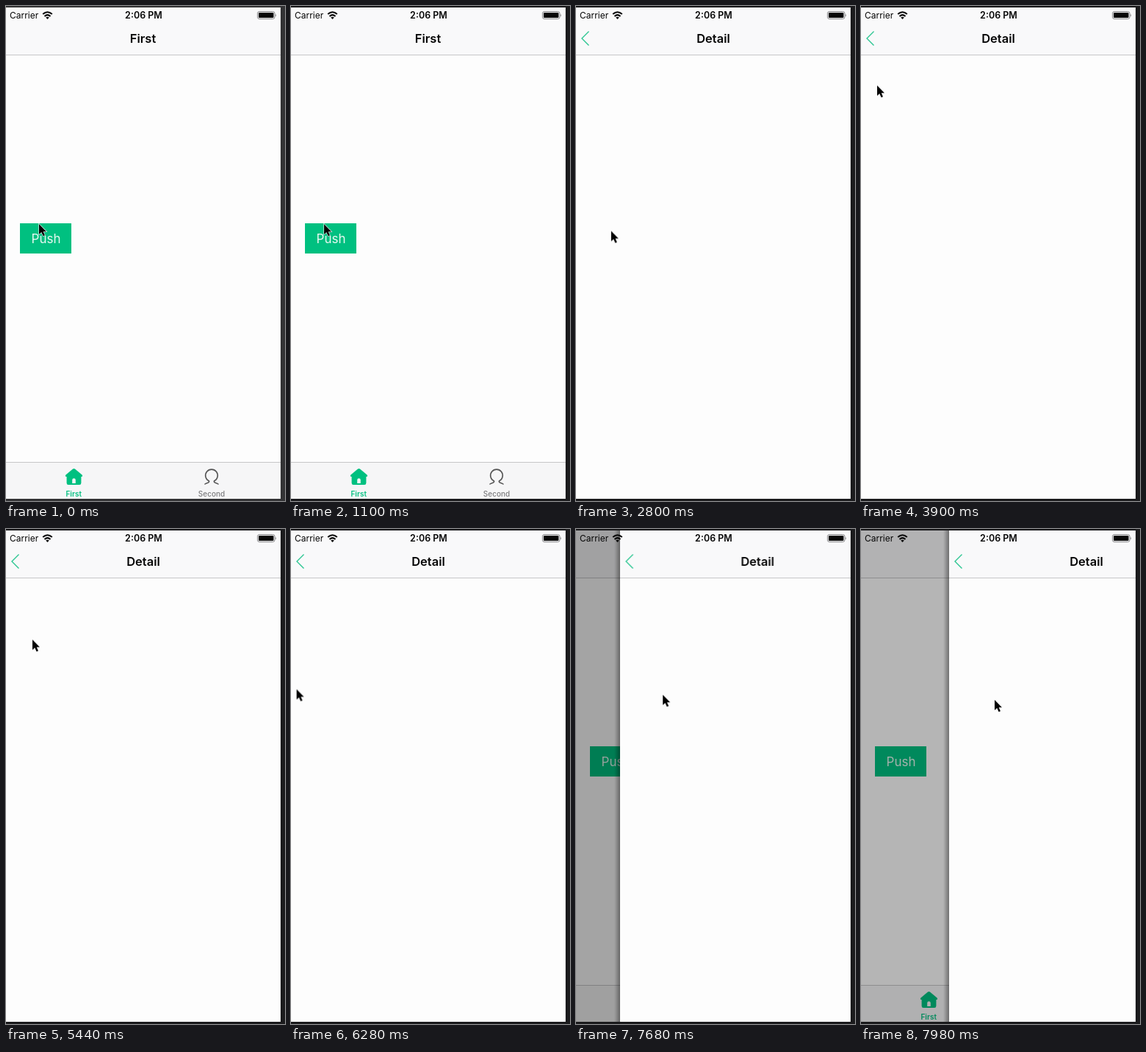
Animation of 380 by 672 pixels, one loop 8 s. Source, as an HTML page:

```html
<!DOCTYPE html>
<html lang="en">
<head>
<meta charset="utf-8">
<title>Push and swipe back</title>
<style>
  html, body { margin: 0; width: 100%; height: 100%; overflow: hidden; background: #1b1b1d; }
  svg { display: block; width: 380px; height: 672px; font-family: Inter, Roboto, sans-serif; }

  .frame, .page, .shadow, .dim, .cursor { animation: 8s linear infinite; }
  .frame { animation-name: frame; animation-timing-function: step-end; }
  .page { animation-name: page; }
  .shadow { animation-name: shadow; animation-timing-function: step-end; }
  .dim { animation-name: dim; }
  .cursor { animation-name: cursor; }

  .paper { fill: #fdfdfd; }
  .bar { fill: #f9f9fa; }
  .tabs { fill: #f6f6f7; }
  .rule { fill: #c6c6c8; }
  .green { fill: #00c080; }
  .ink { fill: #060606; }
  .title { font-size: 16.5px; font-weight: 600; text-anchor: middle; }
  .label { font-size: 10px; font-weight: 500; text-anchor: middle; }

  @keyframes frame {
    0% { fill: #333335; }
    5%, 100% { fill: #1b1b1d; }
  }
  @keyframes page {
    0% { transform: translateX(376px); }
    17.25% { transform: translateX(376px); animation-timing-function: cubic-bezier(.25, .565, .3, 1); }
    26.5%, 92% { transform: translateX(0); }
    96% { transform: translateX(60px); }
    96.5% { transform: translateX(69px); }
    97.75% { transform: translateX(90px); }
    99.75%, 100% { transform: translateX(120px); }
  }
  @keyframes shadow {
    0% { opacity: 0; }
    50%, 100% { opacity: 1; }
  }
  @keyframes dim {
    0%, 50% { opacity: 0; }
    50.1%, 92% { opacity: .42; }
    96% { opacity: .353; }
    99.75%, 100% { opacity: .286; }
  }
  @keyframes cursor {
    0%, 13.75% { transform: translate(45px, 296px); }
    16.25%, 34.75% { transform: translate(48px, 309px); }
    44% { transform: translate(42px, 182px); }
    45.25% { transform: translate(42px, 180px); }
    48.75% { transform: translate(22px, 108px); }
    54.5%, 55.75% { transform: translate(12px, 45px); }
    57.75% { transform: translate(18px, 36px); }
    59.75%, 63.25% { transform: translate(9px, 40px); }
    68% { transform: translate(36px, 150px); }
    73.25% { transform: translate(16px, 214px); }
    80.75%, 87.25% { transform: translate(4px, 219px); }
    91% { transform: translate(66px, 224px); }
    96% { transform: translate(118px, 225px); }
    99.75%, 100% { transform: translate(182px, 232px); }
  }
</style>
</head>
<body>
<svg viewBox="0 0 380 672" width="380" height="672">
  <defs>
    <clipPath id="screen"><rect y="2" width="374" height="667"/></clipPath>
    <linearGradient id="edge">
      <stop offset="0" stop-color="#000" stop-opacity="0"/>
      <stop offset="1" stop-color="#000" stop-opacity=".38"/>
    </linearGradient>
  </defs>

  <rect class="frame" width="380" height="672"/>

  <g clip-path="url(#screen)">
    <!-- first screen -->
    <rect class="paper" width="374" height="672"/>
    <rect class="bar" width="374" height="66"/>
    <rect class="rule" y="66" width="374" height="1"/>
    <text class="title ink" x="186.5" y="50">First</text>

    <rect class="green" x="19" y="295" width="70" height="41"/>
    <text x="54.5" y="322" font-size="17" text-anchor="middle" fill="#e6f8f1">Push</text>

    <rect class="tabs" y="619" width="374" height="52"/>
    <rect class="rule" y="619" width="374" height="1"/>
    <path class="green" d="M91 628.6Q92.5 627.4 94 628.6L103.6 636.4Q105 638.6 102.8 639H102.4V647.5Q102.4 650 100 650H85Q82.6 650 82.6 647.5V639H82.2Q80 638.6 81.4 636.4Z"/>
    <path fill="#f6f6f7" d="M90.2 648V643.6a2.3 2.3 0 0 1 4.6 0V648Z"/>
    <text class="label green" x="92.2" y="665.5" style="font-weight:600">First</text>
    <path fill="none" stroke="#555" stroke-width="1.6" stroke-linejoin="round" stroke-linecap="round"
      d="M271 649C273 647.4 277.2 648 276.6 645A8.3 8.3 0 1 1 283.4 645C282.8 648 287 647.4 289 649"/>
    <text class="label" x="280" y="665.5" fill="#7c7c7e">Second</text>

    <rect class="dim" width="374" height="672"/>

    <!-- detail screen -->
    <g class="page">
      <rect class="shadow" x="-8" width="8" height="672" fill="url(#edge)"/>
      <rect class="paper" width="374" height="672"/>
      <rect class="bar" width="374" height="66"/>
      <rect class="rule" y="66" width="374" height="1"/>
      <path d="M17.5 34.5L8 44L17.5 53.5" fill="none" stroke="#2cc692" stroke-width="1.4"/>
      <text class="title ink" x="187" y="50">Detail</text>
    </g>

    <!-- status bar -->
    <g class="ink">
      <text x="5" y="17" font-size="12">Carrier</text>
      <text x="187.5" y="17" font-size="12.5" font-weight="600" text-anchor="middle">2:06 PM</text>
      <path d="M54.2 15.6Q56.5 13.7 58.8 15.6L56.5 18Z"/>
      <path d="M50.2 11.1Q56.5 5.3 62.8 11.1M52.5 13.9Q56.5 10.3 60.5 13.9" fill="none" stroke="#060606" stroke-width="2"/>
      <rect x="342.5" y="7.5" width="23.5" height="10" rx="2.5" fill="none" stroke="#858587"/>
      <rect x="344" y="9" width="20.5" height="7" rx="1"/>
      <path d="M367 10.5q1.8 2 0 4Z" fill="#858587"/>
    </g>
  </g>

  <path class="cursor" d="M0 0V14L3.2 11.1L5.6 16.3L8 15.2L5.7 10.2H10Z" fill="#000" stroke="#fff" stroke-width="1.2" paint-order="stroke"/>
</svg>
</body>
</html>
```
